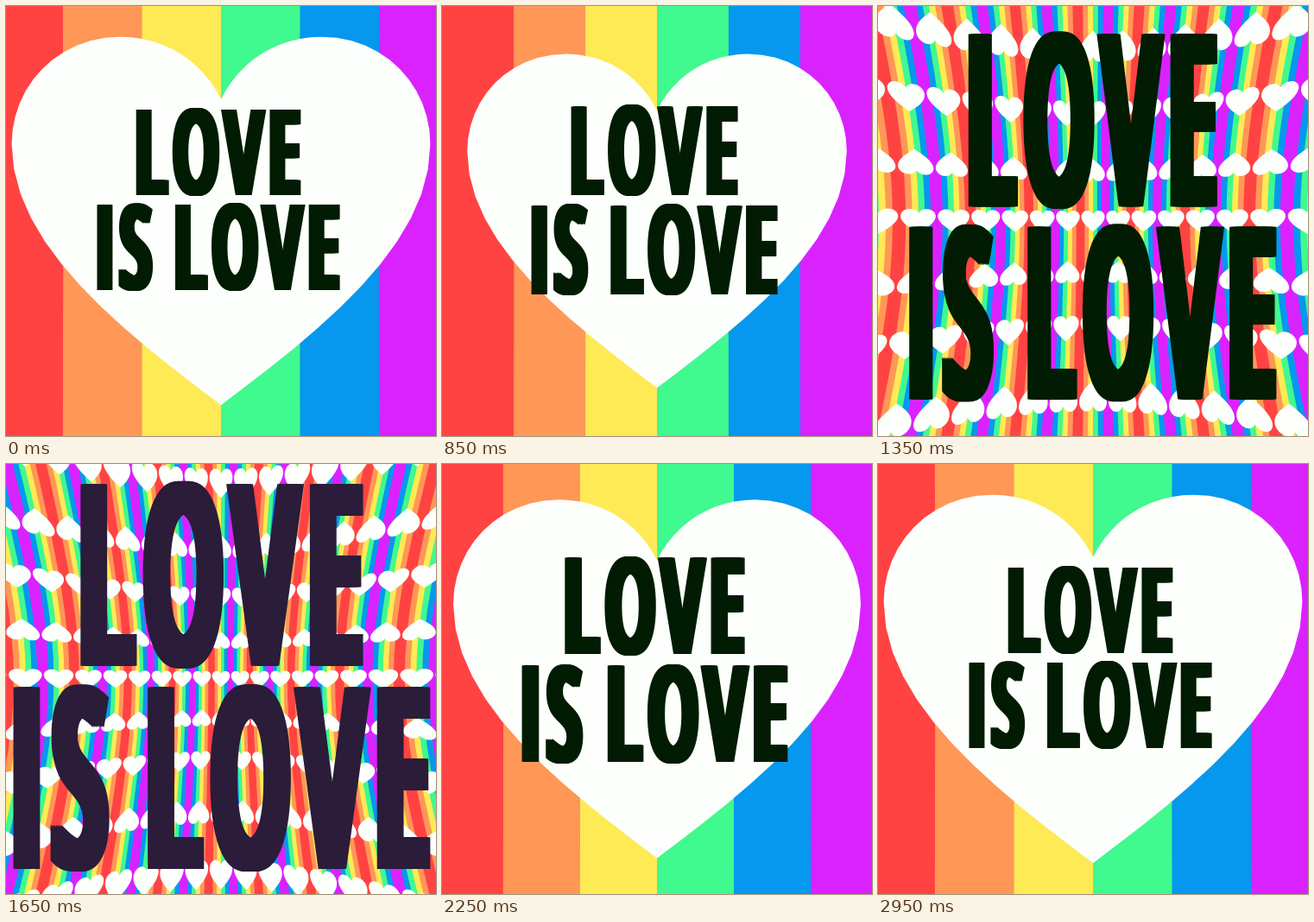
Animation of 498 by 498 pixels, one loop 3000 ms. Source, as an HTML page with a canvas:

```html
<!DOCTYPE html>
<html lang="en">
<head>
<meta charset="utf-8">
<title>Love is love</title>
<style>
  html, body { margin: 0; width: 100%; height: 100%; overflow: hidden; }
  canvas { display: block; width: 498px; height: 498px; }
</style>
</head>
<body>
<canvas id="stage" width="498" height="498" role="img" aria-label="LOVE IS LOVE"></canvas>
<script>
const ctx = document.getElementById('stage').getContext('2d');
const LOOP = 3000, STEP = 50, MID = 249, TILE = 548;
const RAINBOW = ['#ff4343', '#ff9757', '#feea55', '#40f98f', '#0598ee', '#da22ff'];

// Left half of the heart, notch to tip, around the tile centre
const CURVES = [
  [0, -141, -22, -186, -66, -213, -116, -213],
  [-116, -213, -190, -213, -242, -155, -242, -89],
  [-242, -89, -242, 30, -110, 130, 0, 213]
];
const half = CURVES.flatMap(c => Array.from({ length: 12 }, (_, i) => {
  const t = i / 12, u = 1 - t;
  const at = o => u * u * u * c[o] + 3 * u * u * t * c[o + 2] + 3 * u * t * t * c[o + 4] + t * t * t * c[o + 6];
  return [at(0), at(1)];
}));
const heart = [...half, [0, 213], ...half.slice(1).reverse().map(([x, y]) => [-x, y])];

// Time, horizontal and vertical scale of the lettering
const KEYS = [
  [0, 1, 1], [600, 1, 1], [850, 1.013, 1.038], [1350, 1.512, 2.02], [1600, 1.72, 2.135],
  [1650, 1.717, 2.13], [1850, 1.588, 1.857], [2250, 1.094, 1.13], [2500, 1, 1], [3000, 1, 1]
];

// Monotone cubic interpolation through one column of KEYS
function track(t, col) {
  const rate = i => KEYS[i + 1] && KEYS[i] ? (KEYS[i + 1][col] - KEYS[i][col]) / (KEYS[i + 1][0] - KEYS[i][0]) : 0;
  const slope = i => {
    const a = rate(i - 1), b = rate(i);
    return a * b > 0 ? 2 * a * b / (a + b) : 0;
  };
  const i = KEYS.findIndex((k, n) => t < KEYS[n + 1][0]);
  const span = KEYS[i + 1][0] - KEYS[i][0], p = (t - KEYS[i][0]) / span, q = 1 - p;
  return KEYS[i][col] * q * q * (1 + 2 * p) + KEYS[i + 1][col] * p * p * (3 - 2 * p)
    + span * p * q * (slope(i) * q - slope(i + 1) * p);
}

function ease(t, from, to) {
  const p = Math.min(1, Math.max(0, (t - from) / (to - from)));
  return p < 0.5 ? 4 * p ** 3 : 1 - 4 * (1 - p) ** 3;
}

function fillWarped(points, bend, colour) {
  ctx.beginPath();
  for (const [x, y] of points) {
    const f = 1 + bend * (x * x + y * y);
    ctx.lineTo(MID + x * f, MID + y * f);
  }
  ctx.fillStyle = colour;
  ctx.fill();
}

function drawTiles(t) {
  const s = 1 - 0.9705 * (ease(t, 577, 1521) - ease(t, 1525, 2420));
  const bend = 2.5e-8 * s ** -1.84;
  const w = TILE * s, h = 2 * w, band = w / 6, reach = 260;

  // Bands mirror from tile to tile; each one runs under the next
  const bands = Math.ceil(reach / band) + 3;
  for (let n = -bands; n <= bands; n++) {
    const m = ((n % 12) + 12) % 12, left = (n - 3) * band, right = left + 2 * band;
    const edge = [], back = [];
    for (let y = -reach; y <= reach; y += 20) {
      edge.push([left, y]);
      back.unshift([right, y]);
    }
    fillWarped([...edge, ...back], bend, RAINBOW[m < 6 ? m : 11 - m]);
  }

  // Hearts fill a little more of their tile when small
  const size = s * (1 + 0.07 * (1 - s) ** 2);
  const cols = Math.ceil(reach / w), rows = Math.ceil(reach / h);
  for (let j = -rows; j <= rows; j++) {
    const flip = j % 2 ? -size : size;
    for (let i = -cols; i <= cols; i++) {
      fillWarped(heart.map(([x, y]) => [i * w + x * size, j * h + y * flip]), bend, '#fdfffc');
    }
  }
}

function drawLine(text, baseline) {
  const m = ctx.measureText(text);
  const x = (m.actualBoundingBoxLeft - m.actualBoundingBoxRight) / 2;
  // Side-by-side copies give the condensed letters heavy stems
  for (let d = -7.5; d <= 7.5; d += 2.5) ctx.fillText(text, x + d, baseline);
}

function drawText(t) {
  const sx = track(t, 1), sy = track(t, 2);
  const tint = Math.max(0, 1 - Math.abs(t - 1650) / 200);
  ctx.save();
  ctx.translate(246 + 5.6 * (sx - 1), 224 + 19 * (sy - 1));
  ctx.scale(0.499 * sx, sy);
  ctx.font = '700 138.5px "Open Sans", "Noto Sans", sans-serif';
  ctx.fontKerning = 'none';
  ctx.letterSpacing = '10.5px';
  ctx.wordSpacing = '-8px';
  ctx.fillStyle = `rgb(${1 + 42 * tint}, 28, ${2 + 56 * tint})`;
  drawLine('LOVE', -5.5);
  drawLine('IS LOVE', 105);
  ctx.restore();
}

let shown = -1;
function frame() {
  const t = Math.floor(performance.now() % LOOP / STEP) * STEP;
  if (t !== shown) {
    shown = t;
    drawTiles(t);
    drawText(t);
  }
  requestAnimationFrame(frame);
}
frame();
</script>
</body>
</html>
```
